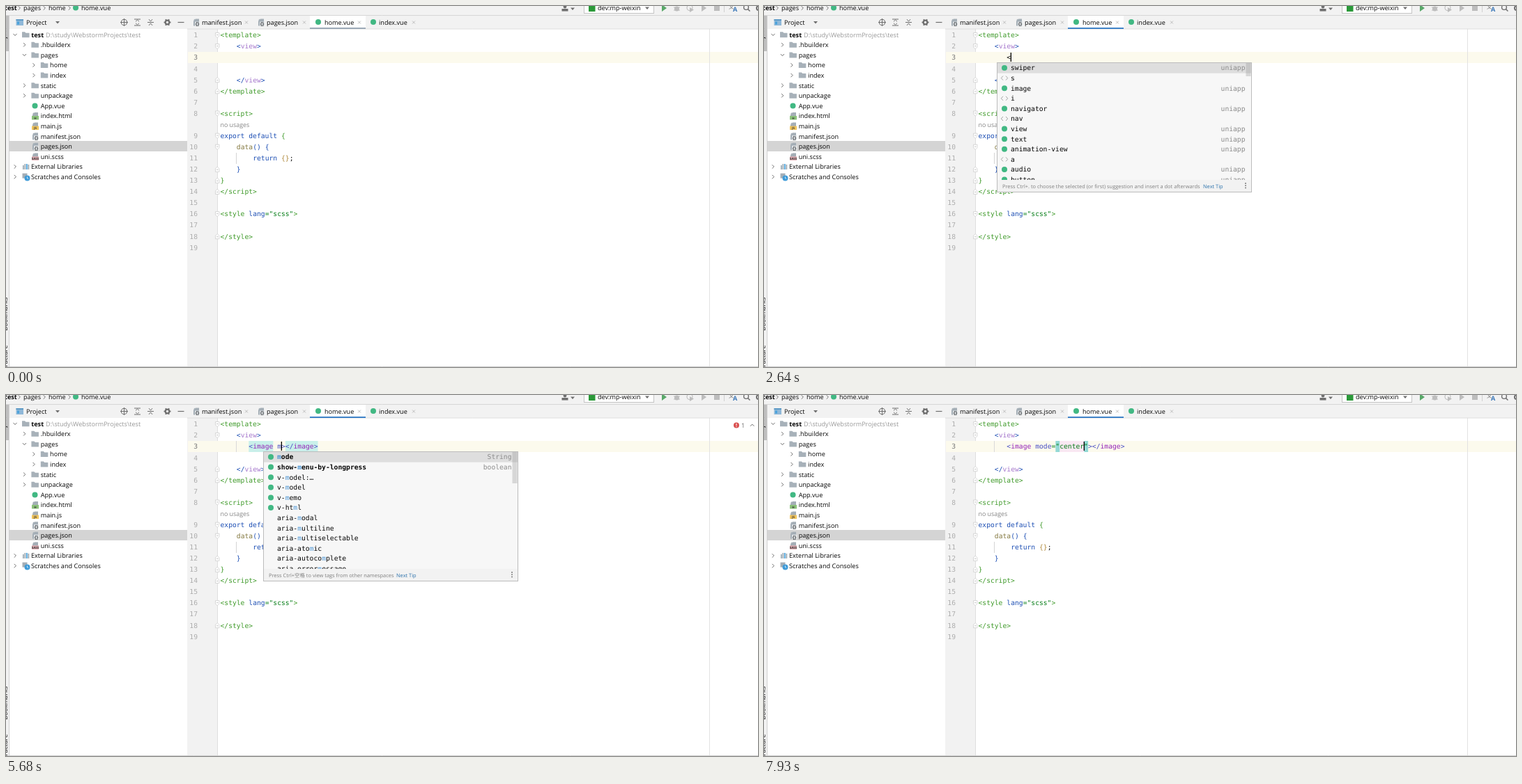
Animation, 1079 px wide and 519 px high, one loop 8000 ms. Source, as an HTML page with a canvas:

```html
<!DOCTYPE html>
<html lang="en">
<head>
<meta charset="utf-8">
<title>Code completion</title>
<style>
html, body { margin: 0; height: 100%; overflow: hidden; background: #fff; }
canvas { display: block; }
</style>
</head>
<body>
<canvas id="stage" width="1079" height="519"></canvas>
<script>
const ctx = document.getElementById('stage').getContext('2d');
ctx.textRendering = 'geometricPrecision';

const LOOP = 8000, CHAR = 5.835, LEFT = 307.5, PITCH = 16.07, ROW = 14.6;
const SANS = '"Open Sans", "Noto Sans", "Noto Sans CJK SC", sans-serif';
const UI = '9.1px ' + SANS, UI_BOLD = 'bold 9.1px ' + SANS, SMALL = '7.45px ' + SANS;
const MONO = '9.69px "DejaVu Sans Mono", monospace', MONO_BOLD = 'bold ' + MONO;
const INK = '#080808', GREY = '#6e6e6e', PANEL = '#f2f2f2', VUE = '#41b883';
const GREEN = '#3f9a2a', BLUE = '#1d4fb4', LILAC = '#a678cc', OCHER = '#b08a3e',
      OLIVE = '#857a42', STRING = '#067d17', PURPLE = '#9526b8', ATTR = '#4a4fc4';

function rect(x, y, w, h, color) {
  ctx.fillStyle = color;
  ctx.fillRect(x, y, w, h);
}
function text(s, x, y, color = INK, font = UI, align = 'left') {
  ctx.font = font;
  ctx.fillStyle = color;
  ctx.textAlign = align;
  ctx.fillText(s, x, y + 3.3);
}
function line(points, color = GREY, width = 1) {
  ctx.strokeStyle = color;
  ctx.lineWidth = width;
  ctx.beginPath();
  for (let i = 0; i < points.length; i += 2) ctx.lineTo(points[i], points[i + 1]);
  ctx.stroke();
}
function shape(points, color) {
  ctx.fillStyle = color;
  ctx.beginPath();
  for (let i = 0; i < points.length; i += 2) ctx.lineTo(points[i], points[i + 1]);
  ctx.fill();
}
function disc(x, y, r, color) {
  ctx.fillStyle = color;
  ctx.beginPath();
  ctx.arc(x, y, r, 0, 7);
  ctx.fill();
}
function ring(x, y, r, color = GREY, width = 1.1) {
  ctx.strokeStyle = color;
  ctx.lineWidth = width;
  ctx.beginPath();
  ctx.arc(x, y, r, 0, 7);
  ctx.stroke();
}
function frameRect(x, y, w, h, color) {
  ctx.strokeStyle = color;
  ctx.lineWidth = 1;
  ctx.strokeRect(x, y, w, h);
}

const rowY = r => 42 + PITCH * r;
const colX = c => LEFT + CHAR * c;

function code(row, col, ...parts) {
  for (let i = 0; i < parts.length; i += 2) {
    text(parts[i + 1], colX(col), rowY(row), parts[i], MONO);
    col += parts[i + 1].length;
  }
}
function chevron(x, y, open) {
  line(open ? [x - 2.5, y - 1.3, x, y + 1.4, x + 2.5, y - 1.3]
            : [x - 1.3, y - 2.7, x + 1.4, y, x - 1.3, y + 2.7], '#707070');
}
function dropArrow(x, y) { shape([x - 3, y - 1.5, x + 3, y - 1.5, x, y + 2], GREY); }
function vueIcon(x, y) { disc(x, y, 4, VUE); }
function folder(x, y) {
  shape([x, y - 4, x + 4, y - 4, x + 5.5, y - 2.5, x + 10.5, y - 2.5, x + 10.5, y + 4, x, y + 4], '#a7b1b9');
}
function fileIcon(x, y, label, color) {
  shape([x + 4, y - 5, x + 9, y - 5, x + 9, y + 5, x + 1, y + 5, x + 1, y - 2], '#a4aeb6');
  shape([x + 1, y - 3, x + 3, y - 5, x + 3, y - 3], '#a4aeb6');
  if (label === '{}') {
    rect(x + 3, y - 1, 7, 6.5, '#e4e7e9');
    text('{}', x + 6.5, y + 1.6, '#3c4145', 'bold 7px ' + SANS, 'center');
  } else {
    rect(x, y, 10, 5.5, color);
    text(label, x + 5, y + 1.4, '#333', 'bold 4.5px ' + SANS, 'center');
  }
}
const json = (x, y) => fileIcon(x, y, '{}');

function drawToolbar() {
  rect(0, 0, 1079, 33, PANEL);
  text('test', -2, 3, INK, UI_BOLD);
  text('pages', 25, 3);
  text('home', 61, 3);
  text('home.vue', 108, 3);
  chevron(19, 3);
  chevron(55, 3);
  chevron(91, 3);
  vueIcon(100, 2.5);

  disc(802, 1, 2.4, GREY);
  rect(797.5, 4, 9, 3.5, GREY);
  dropArrow(813, 4);
  rect(829.5, -1, 100, 11, '#fff');
  frameRect(829.5, -4.5, 100, 15, '#c4c4c4');
  rect(836, -2, 9.5, 10, '#2b9939');
  text('dev:mp-weixin', 849, 3);
  dropArrow(920, 3);
  shape([941, -2, 948, 3, 941, 8], '#59a869');
  disc(962.5, 4, 3.5, '#bdbdbd');
  line([958, 2, 967, 2], '#bdbdbd');
  line([958, 6, 967, 6], '#bdbdbd');
  ring(981, 2.5, 4, '#bdbdbd');
  shape([981, 2, 987, 5.5, 981, 9], '#bdbdbd');
  shape([998, -2, 1005, 3, 998, 8], '#bdbdbd');
  rect(1016, -1, 8, 8, '#bdbdbd');
  line([1030.5, 0, 1030.5, 9], '#d0d0d0');
  text('文', 1037, 1, GREY, SMALL);
  text('A', 1043, 5, '#3c78b8', UI_BOLD);
  ring(1062, 2, 3.4, GREY, 1.4);
  line([1064.5, 4.5, 1067.5, 7.5], GREY, 1.5);
  ring(1080, 3, 3, GREY, 2);
  line([0, 13.5, 1079, 13.5], '#d6d6d6');
}

function drawTabs(focused) {
  const tabs = [[268, 281, 'manifest.json', 345], [361, 374, 'pages.json', 428],
                [443, 457, 'home.vue', 507], [522, 535, 'index.vue', 585]];
  rect(436, 14, 80, 19, '#fff');
  for (const [icon, x, name, close] of tabs) {
    name.endsWith('.vue') ? vueIcon(icon + 5, 23) : json(icon, 23.5);
    text(name, x, 23.5);
    line([close - 2, 21.5, close + 2, 25.5], '#b0b0b0', .8);
    line([close + 2, 21.5, close - 2, 25.5], '#b0b0b0', .8);
  }
  line([260, 33, 1079, 33], '#d6d6d6', .8);
  rect(436, 31, 80, 2, focused ? '#4083c9' : '#9ca9b7');
}

function drawProject() {
  rect(0, 14, 4, 505, PANEL);
  rect(0, 14, 4, 51, '#bfbfbf');
  ctx.save();
  ctx.beginPath();
  ctx.rect(0, 14, 4, 505);
  ctx.clip();
  ctx.rotate(-Math.PI / 2);
  text('Bookmarks', -467, -1.5);
  text('Structure', -527, -1.5);
  text('Project', -61, -3.5);
  ctx.restore();
  line([4.5, 14, 4.5, 518], '#d1d1d1');

  rect(14.5, 19, 10.5, 9, '#8fb8d8');
  rect(14.5, 19, 10.5, 2, '#5d9ac6');
  rect(16, 22.5, 3, 4, '#4aa3dc');
  text('Project', 29, 23.5);
  dropArrow(74, 23.5);
  ring(169.5, 23.5, 4.2);
  line([169.5, 18, 169.5, 29]);
  line([164, 23.5, 175, 23.5]);
  for (const x of [188, 207]) {
    const out = x === 188;
    if (out) line([184, 19, 193, 19]), line([184, 28, 193, 28]);
    else line([203, 23.5, 212, 23.5]);
    const from = out ? 1.2 : 4.4, to = out ? 3.6 : 1.4;
    for (const s of [-1, 1])
      line([x - 2, 23.5 + s * from, x + .5, 23.5 + s * to, x + 3, 23.5 + s * from]);
  }
  ring(231.5, 23.5, 2.8, GREY, 2.2);
  for (let a = 0; a < 6; a++) {
    const dx = Math.cos(a * Math.PI / 3), dy = Math.sin(a * Math.PI / 3);
    line([231.5 + dx * 3, 23.5 + dy * 3, 231.5 + dx * 5, 23.5 + dy * 5], GREY, 1.8);
  }
  line([246.5, 23.5, 255.5, 23.5], GREY, 1.2);

  rect(5, 194, 255, 15, '#d4d4d4');
  const y = i => 41.2 + ROW * i;
  const folders = [[0, 'test', 1], [1, '.hbuilderx'], [1, 'pages', 1], [2, 'home'], [2, 'index'], [1, 'static'], [1, 'unpackage']];
  folders.forEach(([depth, name, open], i) => {
    const x = 23 + depth * 13.4;
    chevron(x - 10, y(i), open);
    folder(x, y(i));
    text(name, x + 13.3, y(i), INK, i ? UI : UI_BOLD);
  });
  text('D:\\study\\WebstormProjects\\test', 57, y(0), '#999');
  const files = [['App.vue'], ['index.html', 'H', '#8cc27a'], ['main.js', 'JS', '#f0c45c'],
                 ['manifest.json', '{}'], ['pages.json', '{}'], ['uni.scss', 'SASS', '#e3aeb4']];
  files.forEach(([name, label, color], i) => {
    label ? fileIcon(37, y(i + 7), label, color) : vueIcon(41.5, y(7));
    text(name, 49.7, y(i + 7));
  });
  chevron(13, y(13));
  [[24, 6], [26.5, 8], [29, 8], [31.5, 7]].forEach(([x, h], i) =>
    rect(x, y(13) + 4 - h, 1.7, h, i === 2 ? '#4aa3dc' : '#9aa7b0'));
  text('External Libraries', 36, y(13));
  chevron(13, y(14));
  rect(23.5, y(14) - 5, 7, 7, '#a4aeb6');
  disc(30.5, y(14) + 2, 4, '#3f9bd8');
  line([30.5, y(14), 30.5, y(14) + 2, 32, y(14) + 3], '#fff', .8);
  text('Scratches and Consoles', 36, y(14));
}

function drawEditor() {
  rect(260, 33, 43, 486, PANEL);
  line([303.5, 33, 303.5, 518], '#dedede');
  rect(261, 66, 818, 16, '#fcfaed');
  line([1009.5, 33, 1009.5, 518], '#e2e2e2');
  for (let n = 1; n < 20; n++)
    text(n, 275, rowY(n < 9 ? n - 1 : n), n === 3 ? '#777' : '#adadad', MONO, 'right');

  const foldStarts = [0, 1, 7, 9, 10, 16], foldEnds = [4, 5, 12, 13, 14, 18];
  for (const r of [...foldStarts, ...foldEnds]) {
    const y = rowY(r), s = foldStarts.includes(r) ? 1 : -1;
    const outline = [300.5, y - 3.5 * s, 306, y - 3.5 * s, 306, y + s, 303.2, y + 3.8 * s, 300.5, y + s, 300.5, y - 3.5 * s];
    shape(outline, '#fff');
    line(outline, '#cfcfcf', .8);
    line([302, y - .5 * s, 304.5, y - .5 * s], '#b5b5b5', .8);
  }

  code(0, 0, GREEN, '<template>');
  code(1, 4, BLUE, '<', LILAC, 'view', BLUE, '>');
  code(4, 4, BLUE, '</', LILAC, 'view', BLUE, '>');
  code(5, 0, GREEN, '</template>');
  code(7, 0, GREEN, '<script>');
  text('no usages', 307.5, rowY(8), '#858585', '8.9px ' + SANS);
  code(9, 0, BLUE, 'export default ', GREEN, '{');
  code(10, 4, OLIVE, 'data', BLUE, '() {');
  code(11, 8, BLUE, 'return ', OCHER, '{}', INK, ';');
  line([330.5, 211, 330.5, 227], '#d5d5d5');
  code(12, 4, BLUE, '}');
  code(13, 0, GREEN, '}');
  code(14, 0, GREEN, '</' + 'script>');
  code(16, 0, GREEN, '<style ', BLUE, 'lang', STRING, '="scss"', GREEN, '>');
  code(18, 0, GREEN, '</style>');
}

function mark(col, length, color) { rect(colX(col), 66, CHAR * length, 16, color); }

// The line being typed: opening tag, attribute, closing tag, caret.
function drawTyping(t) {
  const CYAN = '#c9f0ea', TEAL = '#93d9d5';
  const typed = t < 2450 ? '' : t < 2920 ? '<' : t < 2990 ? '<i' : t < 3860 ? '<im' : '<image';
  const attr = t < 5250 ? '' : t < 5550 ? ' ' : t < 6410 ? ' m' : t < 7660 ? ' mode=""' : ' mode="center"';
  const closed = t >= 4460, end = 13 + attr.length;
  if (t >= 3990 && t < 7800) {
    mark(7, 6, CYAN);
    if (closed) mark(end + 1, 8, CYAN);
  }
  if (t >= 6410) {
    mark(20, attr.length - 8, '#fae8f3');
    mark(19, 1, TEAL);
    mark(end - 1, 1, TEAL);
  }
  if (t >= 3860) line([330.5, 66, 330.5, 82], '#d9d9d9');
  code(2, 7, t < 3860 ? INK : ATTR, typed.slice(0, 1), t < 3860 ? INK : PURPLE, typed.slice(1));
  code(2, 13, ATTR, attr.slice(0, 5), STRING, attr.slice(5));
  if (closed) code(2, end, ATTR, '></', PURPLE, 'image', ATTR, '>');
  if (t >= 4130 && !closed) line([384.5, 79, 386, 77.5, 387.5, 79, 389, 78], '#e03030', .9);

  const caret = !closed ? 7 + typed.length : t < 4990 ? 14 : t < 6410 ? end : end - 1;
  const hidden = t < 1320 || (t >= 1790 && t < 2320) || (t >= 7410 && t < 7660);
  if (!hidden) rect(Math.round(colX(caret)) - .3, 67, 1.3, 13, '#000');

  if (t >= 2120 && t < 2450) {
    disc(318, 58, 3.6, '#f0b63c');
    rect(316, 62, 4, 2.5, '#7d8489');
  }
  if (t >= 4130 && t < 6410) {
    disc(1048, 43.5, 4, '#d9504f');
    text('!', 1048, 43, '#fff', 'bold 7px ' + SANS, 'center');
    text('1', 1055, 43.5, GREY);
    line([1068, 44.8, 1070.7, 42, 1073.4, 44.8]);
  } else if (t >= 6610 && t < 7930) {
    text('Paused...', 1051, 43.5, '#b5b5b5');
  }
}

// Item prefixes: "+" component with an icon, "-" plain tag, "*" bold with icon, "." no icon.
const list = s => s.split(' ').map(w => ({ kind: w[0], name: w.slice(1).replace('_', ' ') }));
const CTRL_DOT = ['Press Ctrl+. to choose the selected (or first) suggestion and insert a dot afterwards', 296];
const POPUPS = [
  { from: 2580, to: 2920, x: 334, thumb: 19, tip: CTRL_DOT, note: 'uniapp',
    items: list('+swiper -s +image -i +navigator -nav +view +text +animation-view -a +audio +button') },
  { from: 2920, to: 2990, x: 334, thumb: 60, tip: CTRL_DOT, note: 'uniapp', query: 'i',
    items: list('+image -i +input +icon -img -iframe -ins +animation-view +cover-image +navigator +view +swiper') },
  { from: 2990, to: 3860, x: 334, thumb: 0, tip: CTRL_DOT, note: 'uniapp', query: 'im',
    items: list('+image -img +cover-image +animation-view -animate -animateMotion -animateTransform -time') },
  { from: 5680, to: 6410, x: 369, thumb: 45, query: 'm', tip: ['Press Ctrl+空格 to view tags from other namespaces', 191],
    items: list('*mode *show-menu-by-longpress +v-model:… +v-model +v-memo +v-html .aria-modal .aria-multiline .aria-multiselectable .aria-atomic .aria-autocomplete .aria-errormessage') },
  { from: 6610, to: 7660, x: 419, thumb: 137, flat: true, tip: CTRL_DOT,
    items: list('.aspectFill .center .aspectFit .bottom .bottom_left .bottom_right .heightFix .left .right .scaleToFill .top .top_left') }
];

function drawPopup(p, t) {
  const { x, items, query } = p, top = 81, width = 366;
  const listHeight = Math.min(169, Math.round(items.length * ROW) + 2), foot = top + listHeight;
  const picked = p.flat && t >= 7410 ? 1 : 0;
  rect(x, top, width, listHeight + 18, '#f7f7f7');
  ctx.save();
  ctx.beginPath();
  ctx.rect(x, top, width, listHeight);
  ctx.clip();
  rect(x, Math.round(top + 1 + picked * ROW), width, 15 - !picked * .4, picked ? '#c5dffb' : '#dedede');
  items.forEach(({ kind, name }, i) => {
    const y = 89 + ROW * i, tx = x + (p.flat ? 5 : 20), font = kind === '*' ? MONO_BOLD : MONO;
    if (kind === '+' || kind === '*') vueIcon(x + 11, y);
    if (kind === '-') {
      line([x + 9, y - 3, x + 6.3, y, x + 9, y + 3], '#9a9a9a', .9);
      line([x + 13, y - 3, x + 15.7, y, x + 13, y + 3], '#9a9a9a', .9);
    }
    const at = query ? name.indexOf(query) : -1;
    const before = at < 0 ? name : name.slice(0, at);
    text(before, tx, y, INK, font);
    if (at >= 0) {
      const after = at + query.length;
      text(query, tx + at * CHAR, y, '#4a93d2', font);
      text(name.slice(after), tx + after * CHAR, y, INK, font);
    }
    const note = kind === '*' ? (i ? 'boolean' : 'String') : kind === '+' && p.note;
    if (note) text(note, x + 356.5, y, '#8c8c8c', MONO, 'right');
  });
  rect(x + 357.5, top + 1, 7, p.thumb, 'rgba(150,150,150,.33)');
  ctx.restore();
  rect(x, foot, width, 18, PANEL);
  text(p.tip[0], x + 8, foot + 8.5, '#808080', SMALL);
  text('Next Tip', x + p.tip[1], foot + 8.5, '#2f74ad', SMALL);
  for (const d of [-3.2, 0, 3.2]) disc(x + 357, foot + 8.2 + d, .9, '#6b6b6b');
  frameRect(x + .5, top + .5, width - 1, listHeight + 17, '#bcbcbc');
}

const MOUSE = [[70, 999, 503], [340, 640, 370], [620, 334, 190], [820, 424, 109],
               [970, 421, 94], [1250, 406.5, 74.5], [1590, 406.5, 74.5]];

function drawMouse(t) {
  if (t < 70 || t >= 1590) return;
  const now = 70 + Math.floor((t - 70) / 68.2 + .01) * 68.2;
  const i = Math.max(1, MOUSE.findIndex(m => m[0] > now));
  const [t0, x0, y0] = MOUSE[i - 1], [t1, x1, y1] = MOUSE[i];
  const k = (now - t0) / (t1 - t0);
  const x = Math.round(x0 + (x1 - x0) * k) - .5, y = Math.round(y0 + (y1 - y0) * k) - .5;
  line([x, y - 4, x, y + 4], '#222');
  for (const s of [-1, 1]) line([x - 2.5, y + 4.5 * s, x + 2.5, y + 4.5 * s], '#222');
}

function draw(now) {
  const t = now % LOOP;
  rect(0, 0, 1079, 519, '#fff');
  drawToolbar();
  drawEditor();
  drawTabs(t >= 1320);
  drawProject();
  drawTyping(t);
  const popup = POPUPS.find(p => t >= p.from && t < p.to);
  if (popup) drawPopup(popup, t);
  drawMouse(t);
  line([0, 518.5, 1079, 518.5], '#cfcfcf');
}

const start = performance.now();
function frame() {
  draw(performance.now() - start);
  requestAnimationFrame(frame);
}
frame();
</script>
</body>
</html>
```
